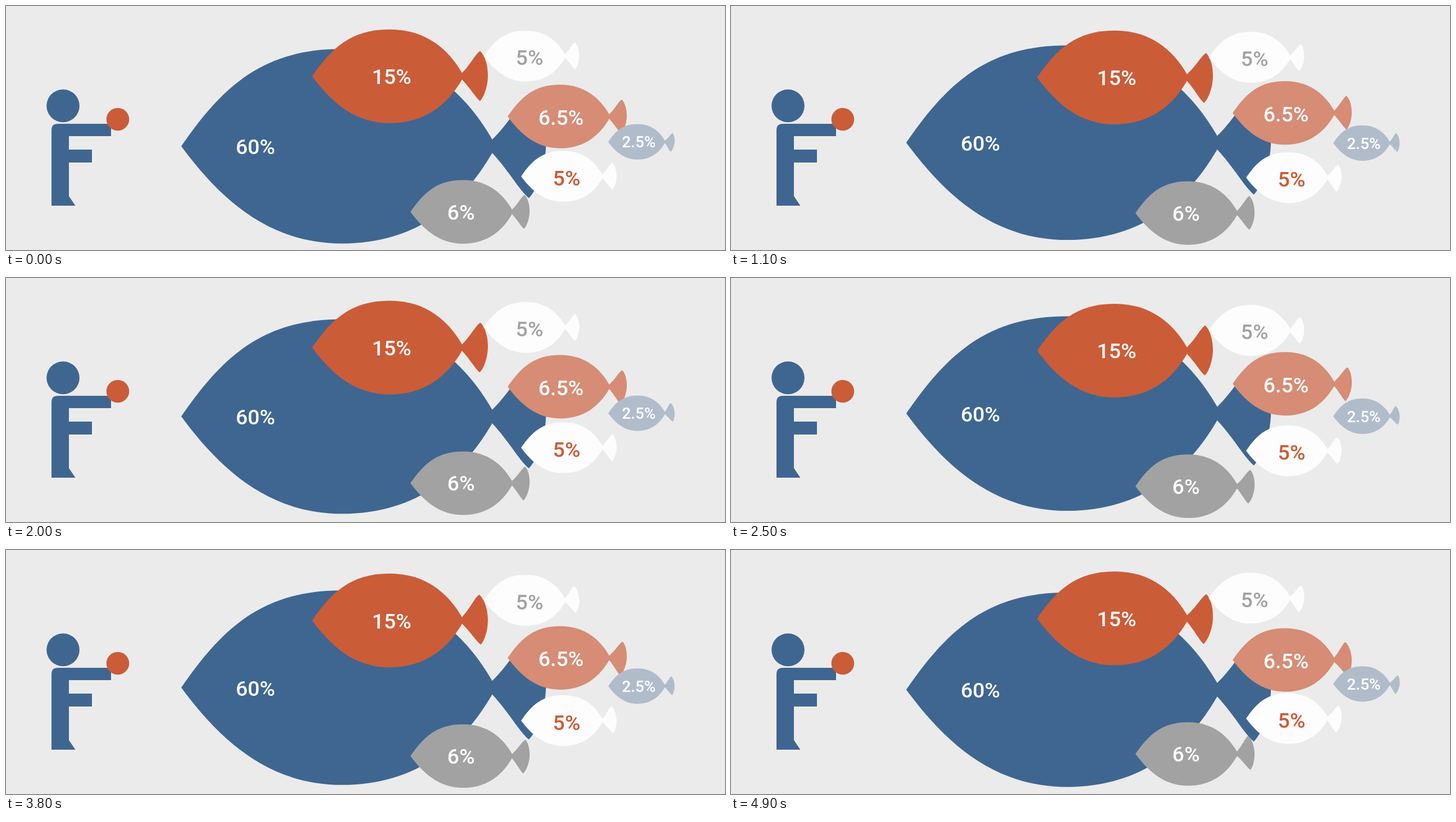
Recreate the animation shown at these times as an HTML page. Size 1280 px wide and 435 px high, loop 5000 ms.

```html
<!DOCTYPE html>
<html lang="en">
<head>
<meta charset="utf-8">
<title>Fish shares</title>
<style>
  html, body { margin: 0; width: 100%; height: 100%; overflow: hidden; background: #ebebeb; }
  svg { display: block; width: 100%; height: 100%; }
  text { font-family: Roboto, "Open Sans", sans-serif; font-weight: 500; text-anchor: middle; }
</style>
</head>
<body>
<svg id="stage" viewBox="0 0 1280 435">
  <g fill="#3e6691">
    <circle cx="101.5" cy="178" r="29.3"/>
    <path d="M81 356V221Q81 210 92 210H187V232H112V256H153V279H112V339L123.5 356Z"/>
  </g>
  <circle cx="199" cy="202" r="20.3" fill="#cb5c38"/>
</svg>
<script>
const LOOP = 5000, STEP = 100;

// Fish outline with its nose at 0,0 and the tail joint at 1,0.
const BODY = `M0 0C.129 -.188 .2585 -.313 .517 -.313
  C.752 -.313 .903 -.189 1 -.0205V.0205
  C.903 .189 .752 .313 .517 .313C.284 .313 .129 .175 0 0Z`;
const TAIL = `M.998 -.0205C1.06 -.08 1.09 -.148 1.1225 -.167
  C1.155 -.135 1.172 -.07 1.172 -.008
  C1.172 .06 1.148 .135 1.117 .167
  C1.085 .14 1.055 .082 .998 .0205Z`;

// Straight up-and-down drifts: [time, offset]
const TURNS = [0, 890, 1700, 2520, 3350, 4180, 4990];
const RISE = TURNS.map((t, i) => [t, i % 2 ? -8.6 : 0]);
const SINK = TURNS.map((t, i) => [t, i === 0 ? 0 : i % 2 ? 4.4 : -4.4]);

// Sideways swing of the tails, in pixels at the middle of the fin
const SWING = [[0, -.5], [700, 1.7], [1500, .1], [2500, -.3], [3200, -2], [4300, -1.3], [4900, 1.4]];
const BACK = [[0, 0], [700, -1.2], [1500, .4], [2500, 1], [3200, .8], [4300, 1.5], [4900, -2]];
const SMALL = [[0, 1.1], [700, -.4], [1500, -1.7], [2500, -1.7], [3200, -.5], [4300, -1], [4900, 1.5]];
const STILL = [[0, 0]];

const FISH = [
  { x: 312, y: 250, size: 554, fill: '#3e6691', label: '60%', tx: 444, ty: 251, bob: RISE, wag: STILL },
  { x: 545, y: 125.3, size: 267, fill: '#cb5c38', label: '15%', tx: 686.5, ty: 126, bob: SINK, wag: SWING },
  { x: 850.5, y: 89.3, size: 145, fill: '#fdfdfd', label: '5%', tx: 932, ty: 92, ink: '#a2a2a2', bob: SINK, wag: SWING },
  { x: 893, y: 197, size: 181, fill: '#d68c75', label: '6.5%', tx: 988, ty: 198.8, bob: RISE, wag: BACK },
  { x: 917, y: 303.7, size: 145, fill: '#fdfdfd', label: '5%', tx: 998, ty: 307, ink: '#cb5c38', bob: SINK, wag: SWING },
  { x: 1072, y: 242.2, size: 101, fill: '#b1bccb', label: '2.5%', tx: 1126.5, ty: 242.5, font: 28, bob: SINK, wag: SMALL },
  { x: 720, y: 367, size: 181, fill: '#a2a2a2', label: '6%', tx: 810, ty: 367.2, bob: SINK, wag: BACK },
];

const stage = document.getElementById('stage');

function add(parent, tag, attrs) {
  const node = document.createElementNS('http://www.w3.org/2000/svg', tag);
  for (const name in attrs) node.setAttribute(name, attrs[name]);
  return parent.appendChild(node);
}

function valueAt(keys, t) {
  const next = keys.findIndex(key => key[0] > t);
  if (next < 0) return keys[keys.length - 1][1];
  const [t0, v0] = keys[next - 1], [t1, v1] = keys[next];
  return v0 + (v1 - v0) * (t - t0) / (t1 - t0);
}

for (const fish of FISH) {
  const font = fish.font || 37.5;
  fish.group = add(stage, 'g', {});
  const shape = add(fish.group, 'g', {
    fill: fish.fill,
    transform: `translate(${fish.x} ${fish.y}) scale(${fish.size})`
  });
  add(shape, 'path', { d: BODY });
  fish.tail = add(shape, 'path', { d: TAIL });
  add(fish.group, 'text', {
    x: fish.tx, y: fish.ty + font * .355, 'font-size': font, fill: fish.ink || '#fff'
  }).textContent = fish.label;
}

function draw(t) {
  for (const { group, tail, size, bob, wag } of FISH) {
    const angle = Math.atan(valueAt(wag, t) / (size * .13)) * 180 / Math.PI;
    group.setAttribute('transform', `translate(0 ${valueAt(bob, t)})`);
    tail.setAttribute('transform', `rotate(${angle} 1 0)`);
  }
}

const start = performance.now();
function tick() {
  const t = (performance.now() - start) % LOOP;
  draw(Math.floor(t / STEP) * STEP);
  requestAnimationFrame(tick);
}
tick();
</script>
</body>
</html>
```
